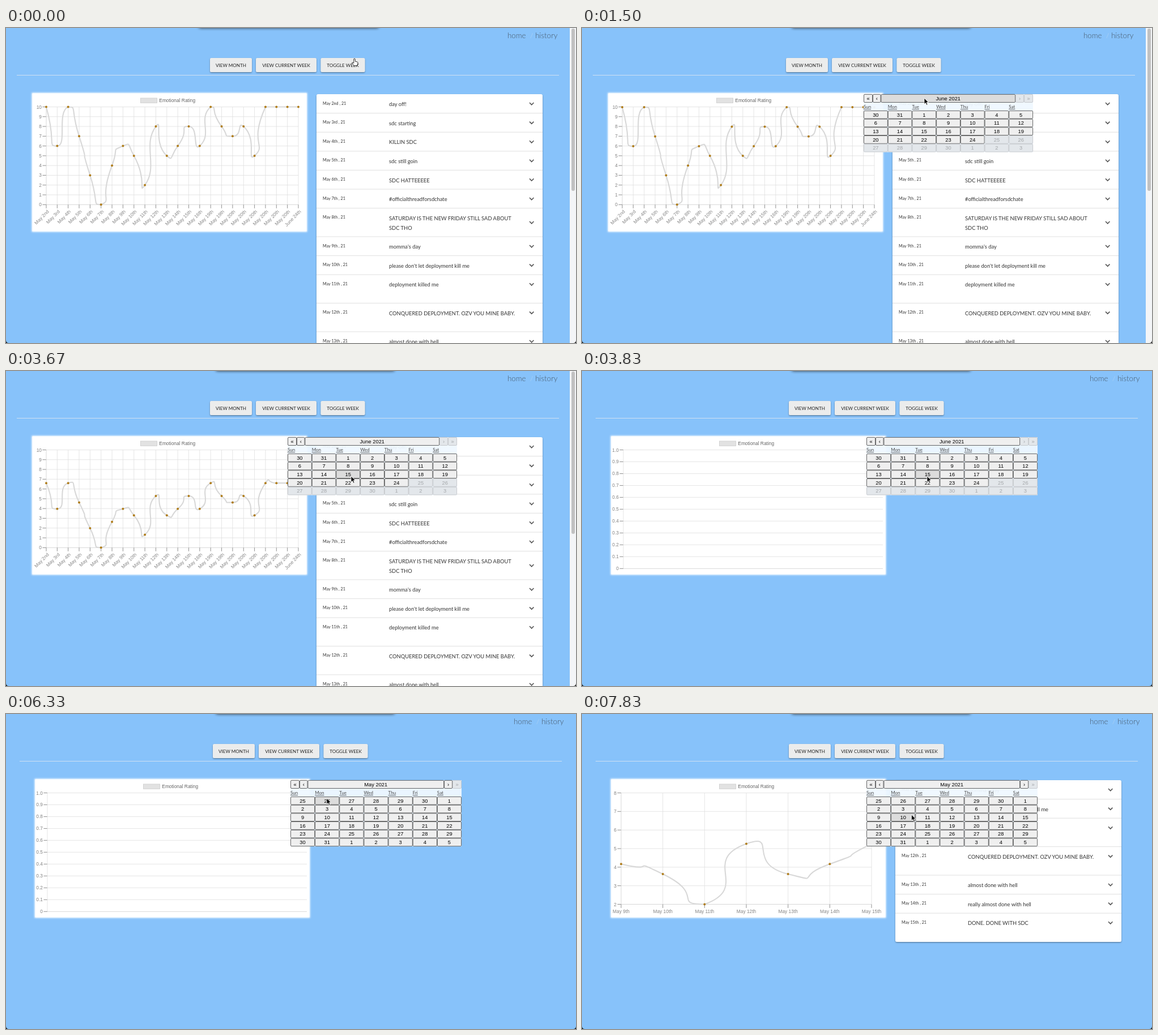
These frames come from a looping animation (1006 by 557 pixels, 8 s). An HTML page:

```html
<!DOCTYPE html>
<html lang="en">
<head>
<meta charset="utf-8">
<title>Mood history</title>
<style>
  html, body { margin: 0; width: 100%; height: 100%; overflow: hidden; background: #87c2fa; }
  svg { display: block; }
  text { font-family: Lato, sans-serif; white-space: pre; }
  .arial { font-family: "Liberation Sans", Arial, sans-serif; }
</style>
</head>
<body>
<svg width="1006" height="557" viewBox="0 0 1006 557">
  <defs>
    <filter id="shadow" x="-20%" y="-20%" width="140%" height="160%">
      <feDropShadow dx="0" dy="1.2" stdDeviation="1.2" flood-opacity=".4"/>
    </filter>
    <filter id="glow" x="-5%" y="-5%" width="110%" height="110%">
      <feGaussianBlur stdDeviation="1.6"/>
    </filter>
    <filter id="blur" x="-10%" y="-200%" width="120%" height="500%">
      <feGaussianBlur stdDeviation="2.5"/>
    </filter>
    <clipPath id="toggleClip"><rect x="555.5" y="53" width="78" height="25" rx="2.5"/></clipPath>
  </defs>
  <g id="stage"></g>
</svg>
<script>
const LOOP = 8000, STEPS_PER_MS = 0.006;
const CLICK = 5, RELOAD = 21, EMPTY = 23, MAY = 31, WEEK = 46;

const ROW = 33.6, TALL = 50.4;
const entries = [
  ['2nd', 'day off!'], ['3rd', 'sdc starting'], ['4th', 'KILLIN SDC'],
  ['5th', 'sdc still goin'], ['6th', 'SDC HATTEEEEE'], ['7th', '#officialthreadforsdchate'],
  ['8th', 'SATURDAY IS THE NEW FRIDAY STILL SAD ABOUT\nSDC THO', TALL],
  ['9th', "momma's day"], ['10th', "please don't let deployment kill me"],
  ['11th', 'deployment killed me', TALL],
  ['12th', 'CONQUERED DEPLOYMENT. OZV YOU MINE BABY.', TALL],
  ['13th', 'almost done with hell'], ['14th', 'really almost done with hell'],
  ['15th', 'DONE. DONE WITH SDC', TALL]
];
const ratings = [10, 6, 10, 7, 3, 0, 4, 6, 5, 2, 8, 5, 6, 8, 6, 10, 8, 7, 8, 5, 10, 10, 10, 10];
const monthLabels = [...entries.map(e => 'May ' + e[0]), 'May 16th', 'May 19th', 'May 19th',
  ...Array(6).fill('May 20th'), 'June 24th'];

// Pointer tip by step: [step, x, y]
const pointerPath = [
  [0, 615, 54], [5, 601, 68], [7, 601, 70], [9, 604, 124], [11, 608, 150], [14, 612, 165],
  [18, 617, 172], [21, 609, 186], [25, 609, 186], [29, 525, 123], [31, 525, 124], [32, 545, 165],
  [33, 545, 165], [35, 570, 188], [36, 566, 156], [37, 566, 156], [38, 566, 149],
  [42, 578, 180], [43, 578, 180], [45, 581.5, 178]
];

const rect = (x, y, w, h, fill, more = '') =>
  `<rect x="${x}" y="${y}" width="${w}" height="${h}" fill="${fill}" ${more}/>`;
const line = (x1, y1, x2, y2, stroke, width = 0.8) =>
  `<path d="M${x1} ${y1}L${x2} ${y2}" stroke="${stroke}" stroke-width="${width}"/>`;
const text = (x, y, size, fill, str, more = '') =>
  `<text x="${x}" y="${y}" font-size="${size}" fill="${fill}" ${more}>${str}</text>`;
const arial = (x, y, size, fill, str, anchor = 'middle', more = '') =>
  text(x, y, size, fill, str, `class="arial" text-anchor="${anchor}" ${more}`);

function pointerAt(step) {
  const i = pointerPath.findIndex(p => p[0] > step);
  if (i < 0) return pointerPath[pointerPath.length - 1].slice(1);
  const [a, ax, ay] = pointerPath[i - 1], [b, bx, by] = pointerPath[i];
  const u = (step - a) / (b - a);
  return [ax + (bx - ax) * u, ay + (by - ay) * u];
}

const easeOutQuart = p => 1 - (1 - Math.min(1, p)) ** 4;

function growth(step) {
  if (step >= WEEK) return easeOutQuart((step - WEEK) / 6 + 0.011);
  if (step >= RELOAD) return easeOutQuart((step - RELOAD) / 6 + 0.07);
  if (step >= CLICK) return easeOutQuart((step - CLICK) / 6 + 0.109);
  return 1;
}

// Cardinal-like spline whose handles are kept inside the plot area
function spline(points, box) {
  const tension = 0.95;
  const clamp = (v, lo, hi) => Math.max(lo, Math.min(hi, v));
  const handles = points.map((p, i) => {
    const a = points[i - 1] || p, b = points[i + 1] || p;
    const before = Math.hypot(p[0] - a[0], p[1] - a[1]);
    const after = Math.hypot(b[0] - p[0], b[1] - p[1]);
    const handle = f => [
      clamp(p[0] + f * (b[0] - a[0]), box.left, box.right),
      clamp(p[1] + f * (b[1] - a[1]), box.top, box.bottom)
    ];
    const unit = tension / (before + after);
    return [handle(-unit * before), handle(unit * after)];
  });
  return 'M' + points[0] + points.slice(1).map((p, i) =>
    `C${handles[i][1]} ${handles[i + 1][0]} ${p}`).join('');
}

function chart(dx, step) {
  const month = step < EMPTY, week = step >= WEEK;
  const box = month ? { left: 71, right: 516, top: 139.5, bottom: 312.3 }
    : week ? { left: 69, right: 511, top: 139.5, bottom: 336.5 }
    : { left: 73, right: 531, top: 139.5, bottom: 349.3 };
  const low = week ? 2 : 0, high = week ? 8 : 10;
  const values = month ? ratings : week ? ratings.slice(7, 14) : [];
  const labels = month ? monthLabels : monthLabels.slice(7, 14);
  const grid = '#dfdfdf', tick = '#8f8f8f', ink = '#858585';
  const { left, right, top, bottom } = box;
  const yOf = v => bottom - (v - low) / (high - low) * (bottom - top);
  const xOf = i => left + (right - left) * i / (values.length - 1);

  let out = rect(45.5 + dx, 114.5, 486, 246, '#fff', 'filter="url(#glow)"')
    + rect(46.5 + dx, 115.5, 484, 244, '#fff')
    + rect(237.5 + dx, 124, 29, 8.4, '#e2e2e2', 'stroke="#d3d3d3" stroke-width="1"')
    + arial(270.3 + dx, 131.2, 8.4, '#666', 'Emotional Rating', 'start');

  for (let v = low; v <= high; v++) {
    const y = yOf(v), label = month || week ? v : v ? (v / 10).toFixed(1) : 0;
    out += line(left, y, right, y, v === low ? '#cfcfcf' : grid)
      + line(left - 6.5, y, left, y, tick, 1)
      + arial(left - 8, y + 3, 8.4, ink, label, 'end');
  }
  if (!values.length) return out + line(left, top, left, bottom, grid);

  values.forEach((v, i) => {
    const x = xOf(i);
    out += line(x, top, x, bottom, i ? grid : '#cfcfcf') + line(x, bottom, x, bottom + 6.5, tick, 1);
    out += month
      ? arial(0, 3, 8.4, ink, labels[i], 'end', `transform="translate(${x + 3} 323) rotate(-46)"`)
      : arial(x, 352.3, 8.4, ink, labels[i]);
  });
  const scale = growth(step);
  const points = values.map((v, i) => [xOf(i), bottom + (yOf(v) - bottom) * scale]);
  out += `<path d="${spline(points, box)}" fill="none" stroke="#d8d8d8" stroke-width="2.1"/>`;
  return out + points.map(([x, y]) => `<circle cx="${x}" cy="${y}" r="2" fill="#b07d1a"/>`).join('');
}

function journal(dx, rows, height) {
  const left = 548 + dx;
  let y = 117, out = rect(left, y, 399, height, '#fff', 'rx="3" filter="url(#shadow)"');
  rows.forEach(([day, note, rowHeight = ROW], i) => {
    const lines = note.split('\n'), mid = y + 17 + (lines.length - 1) * 8.4;
    if (i) out += line(left, y, left + 399, y, '#d9d9d9');
    out += text(left + 11, y + 18.6, 7.2, '#333', `May ${day} , 21`);
    lines.forEach((str, n) => out += text(left + 128, y + 21.2 + n * 16.8, 9.35, '#333', str));
    out += `<path d="M${left + 376} ${mid - 2}l3.7 3.8 3.7-3.8" fill="none" stroke="#555" stroke-width="1.6"/>`;
    y += rowHeight;
  });
  return out;
}

function calendar(left, width, may, pointer) {
  const right = left + width, col = width / 7, rowHeight = 14.7, rows = may ? 6 : 5;
  const button = (x, y, w, h, label, disabled) => {
    const hover = !disabled && pointer[0] >= x && pointer[0] < x + w && pointer[1] >= y && pointer[1] < y + h;
    return rect(x + 0.5, y + 0.4, w - 0.9, h - 0.9, disabled ? '#e3e7eb' : hover ? '#dcdcdc' : '#efefef',
      `rx="1.5" stroke="${disabled ? '#c3c6c9' : '#555'}" stroke-width=".9"`)
      + arial(x + w / 2, y + h / 2 + 3.3, 9.35, disabled ? '#a4a7aa' : '#000', label);
  };
  let out = rect(left, 117, width, 29 + rows * rowHeight, '#f0f8ff', 'opacity=".95"')
    + button(left, 117, 16, 15, '«')
    + button(left + 16, 117, 14.4, 15, '‹')
    + button(left + 30.4, 117, width - 61.3, 15, may ? 'May 2021' : 'June 2021')
    + button(right - 30.9, 117, 15, 15, '›', !may)
    + button(right - 15.9, 117, 15.9, 15, '»', true);
  ['Sun', 'Mon', 'Tue', 'Wed', 'Thu', 'Fri', 'Sat'].forEach((name, i) =>
    out += text(left + i * col, 142.3, 8, '#444', name, 'text-decoration="underline"'));
  for (let i = 0; i < rows * 7; i++) {
    const day = new Date(2021, may ? 3 : 4, (may ? 25 : 30) + i).getDate();
    out += button(left + i % 7 * col, 146 + Math.floor(i / 7) * rowHeight, col, rowHeight, day, !may && i > 25);
  }
  return out;
}

function toolbar(dx, step) {
  let out = '';
  [[360, 74, 'VIEW MONTH'], [441, 107, 'VIEW CURRENT WEEK'], [555.5, 78, 'TOGGLE WEEK']].forEach(([x, w, label], i) => {
    const pressed = i === 2 && step >= CLICK && step < CLICK + 3;
    const hovered = i === 2 && step > 0 && step < CLICK;
    const fill = pressed ? ['#a5abb0', '#b4b7ba', '#d0d1d2'][step - CLICK] : hovered ? '#d8d9da' : '#ebecec';
    out += rect(x + dx, 53, w, 25, fill, 'rx="2.5" filter="url(#shadow)"');
    if (pressed && step === CLICK)
      out += '<circle cx="601" cy="68" r="40" fill="#8b9299" clip-path="url(#toggleClip)"/>';
    out += text(x + w / 2 + dx, 68.8, 8.1, '#222', label, 'text-anchor="middle"');
  });
  return out;
}

function pointerShape([x, y], hand) {
  const d = hand
    ? 'M-1.2 .8Q0-.8 1.2 .8V5L5.3 6Q6.3 6.4 6 8L5 12.5H-1.2L-4.3 8Q-4.5 6.6-3 7L-1.2 8.2Z'
    : 'M0 0V10.5L2.5 8.3 4.2 12.2 6 11.4 4.3 7.6H7.5Z';
  return `<path transform="translate(${x} ${y})" d="${d}" fill="${hand ? '#fff' : '#000'}" stroke="${hand ? '#000' : '#fff'}" stroke-width=".8"/>`;
}

function scene(step) {
  const scrolls = step < EMPTY, dx = scrolls ? 0 : 5, navX = scrolls ? 0 : 11;
  const pointer = pointerAt(step);
  const slide = Math.min(1, step / 2);
  let out = rect(0, 0, 1006, 557, '#87c2fa')
    + rect(340 + 30 * slide, -9, 318 - 2 * slide, 9, '#222', 'rx="4" filter="url(#blur)"')
    + text(885 + navX, 18, 13.4, '#46586a', 'home', 'font-weight="300"')
    + text(925 + navX, 18, 12, '#b9d6f0', '/', 'font-weight="300"')
    + text(934 + navX, 18, 13.4, '#46586a', 'history', 'font-weight="300"')
    + line(19 + dx, 83.5, 976 + dx, 83.5, '#cfe1f2', 1)
    + toolbar(dx, step)
    + chart(dx && step < WEEK ? 5 : dx, step);
  if (scrolls) out += journal(dx, entries, 480);
  else if (step >= WEEK) out += journal(dx, entries.slice(7), 286);
  if (step >= CLICK) out += calendar(497 + dx, scrolls ? 299 : 302, step >= MAY, pointer);
  if (scrolls) out += rect(995, 0, 11, 557, '#f3f5f7') + rect(998, 1, 6, 287, '#c1c1c1', 'rx="3"');
  out += '<path d="M0 552V557H5Q0 557 0 552ZM1006 552V557H1001Q1006 557 1006 552Z" fill="#111"/>';
  return out + pointerShape(pointer, pointer[1] < 78);
}

const stage = document.getElementById('stage');
let shown = -1;
function frame() {
  const step = Math.floor((performance.now() % LOOP) * STEPS_PER_MS + 0.03) % 48;
  if (step !== shown) stage.innerHTML = scene(shown = step);
  requestAnimationFrame(frame);
}
frame();
</script>
</body>
</html>
```
